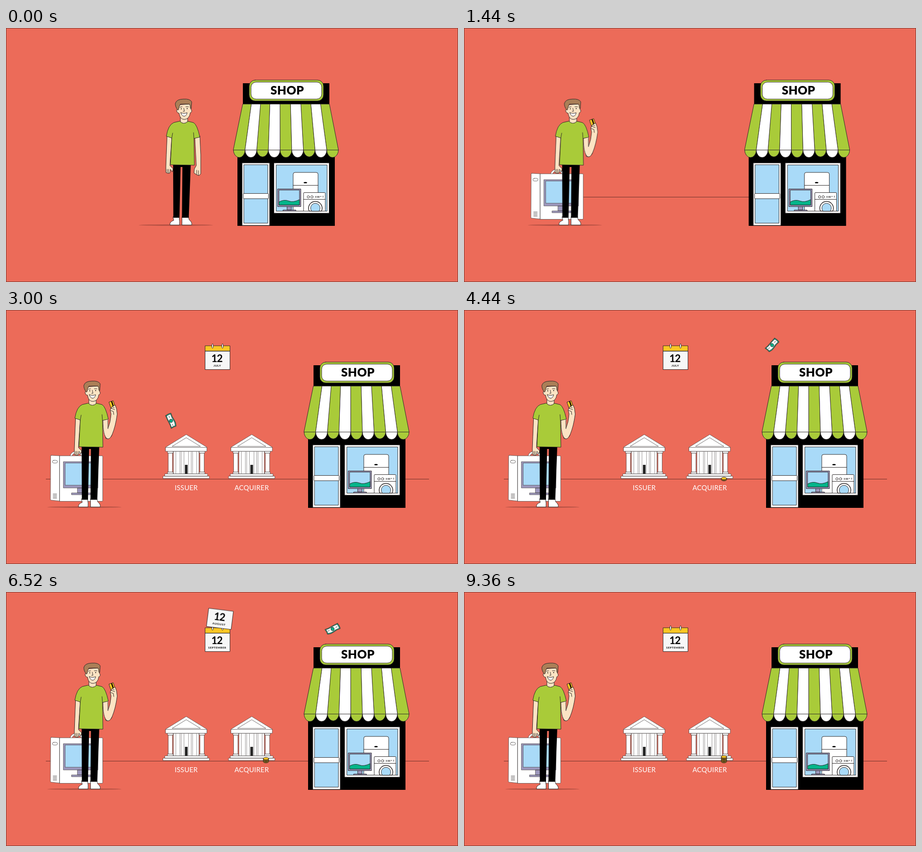
Animation of 998x561 px, one loop 10 s. Source, as an HTML page without scripts:

```html
<!DOCTYPE html>
<html lang="en">
<head>
<meta charset="utf-8">
<title>Shop payment</title>
<style>
html, body { margin: 0; width: 100%; height: 100%; overflow: hidden; background: #ec6b59; }
svg { display: block; width: 998px; height: 561px; }
text { font-family: Lato, "Open Sans", sans-serif; text-anchor: middle; stroke: none; }
.ink { stroke: #2b2626; stroke-width: 1; stroke-linejoin: round; stroke-linecap: round; }
.thin { stroke: #4a4646; stroke-width: .8; }
.white { fill: #fff; } .green { fill: #a9cb39; } .blue { fill: #a9daf8; } .skin { fill: #fce3c3; }
.mauve { fill: #9d98bd; } .teal { fill: #04b58a; } .gold { fill: #fcc624; } .none { fill: none; }
.dark { fill: #000; stroke: none; }
.day { font-size: 22.5px; font-weight: 700; letter-spacing: -1px; }
.month { font-size: 6.4px; font-weight: 700; letter-spacing: .6px; }
.label { font-size: 15px; fill: #fff; letter-spacing: .2px; }

.a { animation: none 10s linear var(--d, 0s) infinite; }
.second { --d: 1.88s; }
.third { --d: 3.8s; }

/* opening: purchase, then both sides part */
.man { animation-name: man; }
.shop { animation-name: shop; }
.road { animation-name: road; transform-origin: 511px 373px; }
.box { animation-name: box; transform-origin: 156px 316px; }
.arm-down { animation-name: armDown; transform-origin: 220px 240px; }
.arm-up { animation-name: armUp; }
.forearm { animation-name: forearm; transform-origin: 223px 278px; }
@keyframes man {
  0%, 9.6% { transform: translateX(202px); animation-timing-function: cubic-bezier(.37, 0, .63, 1); }
  16.8%, 100% { transform: none; }
}
@keyframes shop {
  0%, 9.6% { transform: translateX(-156px); animation-timing-function: cubic-bezier(.37, 0, .63, 1); }
  16.8%, 100% { transform: none; }
}
@keyframes road {
  0%, 9.6% { transform: scaleX(0); animation-timing-function: cubic-bezier(.37, 0, .63, 1); }
  16.8%, 100% { transform: none; }
}
@keyframes box {
  0%, 2% { transform: scale(0); animation-timing-function: cubic-bezier(.2, .7, .3, 1); }
  7%, 100% { transform: none; }
}
@keyframes armDown {
  0%, 2% { transform: none; opacity: 1; animation-timing-function: ease-in; }
  3.99% { transform: rotate(-28deg); opacity: 1; }
  4%, 100% { transform: rotate(-28deg); opacity: 0; }
}
@keyframes armUp { 0%, 3.99% { opacity: 0; } 4%, 100% { opacity: 1; } }
@keyframes forearm {
  0%, 4% { transform: rotate(95deg); animation-timing-function: cubic-bezier(.2, .6, .3, 1); }
  8%, 100% { transform: none; }
}

/* banks and calendar */
.bank { animation-name: bank; transform-origin: 0 372px; }
.late { animation-name: late; }
.cal { animation-name: cal; transform-origin: 467px 104px; }
.page { animation-name: tear; transform-origin: 467px 91px; }
.august { --d: 1.65s; }
@keyframes bank {
  0%, 20.4% { transform: scale(0); animation-timing-function: ease-out; }
  25%, 100% { transform: none; }
}
@keyframes late {
  0%, 21.4% { transform: scale(0); animation-timing-function: ease-out; }
  26%, 100% { transform: none; }
}
@keyframes cal {
  0%, 22.4% { transform: scale(0); animation-timing-function: ease-out; }
  26%, 100% { transform: none; }
}
@keyframes tear {
  0%, 44.8% { transform: none; animation-timing-function: ease-in; }
  52.5%, 100% { transform: translate(24px, -160px) rotate(22deg); }
}

/* one money trip, repeated with delays */
.bx { animation-name: bx; opacity: 0; }
.by { animation-name: by; }
.br { animation-name: br; }
.fee { animation-name: fee; opacity: 0; }
.coin { animation-name: coin; opacity: 0; }
.stack { animation-name: stack; }
@keyframes bx {
  0%, 27.5% { opacity: 0; transform: translateX(237px); }
  27.8% { opacity: 1; transform: translateX(240px); }
  30% { transform: translateX(364px); }
  30.8%, 31.8% { transform: translateX(398px); }
  35.6% { transform: translateX(538px); }
  37.6% { transform: translateX(542px); }
  38.8% { transform: translateX(569px); }
  44.4% { transform: translateX(680px); }
  48.8% { opacity: 1; transform: translateX(770px); }
  49%, 100% { opacity: 0; transform: translateX(770px); }
}
@keyframes by {
  0%, 27.5% { transform: translateY(210px); animation-timing-function: ease-out; }
  28.6% { transform: translateY(198px); animation-timing-function: ease-in; }
  30% { transform: translateY(244px); }
  30.8%, 31.8% { transform: translateY(305px); animation-timing-function: ease-out; }
  33.6% { transform: translateY(210px); animation-timing-function: ease-in; }
  35.6% { transform: translateY(310px); }
  37.6% { transform: translateY(305px); animation-timing-function: cubic-bezier(.2, .5, .5, 1); }
  45.4% { transform: translateY(75px); animation-timing-function: ease-in; }
  48.8%, 100% { transform: translateY(128px); }
}
@keyframes br {
  0%, 27.5% { transform: rotate(-70deg) scale(.3); }
  28.6% { transform: rotate(-50deg) scale(1); }
  30% { transform: rotate(-22deg) scale(1); }
  31.8% { transform: rotate(-8deg) scale(1); }
  35.6% { transform: rotate(32deg) scale(1); }
  38.8% { transform: rotate(4deg) scale(1); }
  44.4% { transform: rotate(45deg) scale(1); }
  48.8%, 100% { transform: rotate(90deg) scale(1); }
}
@keyframes fee {
  0%, 33.6% { opacity: 0; transform: translateY(20px); }
  35%, 35.6% { opacity: 1; transform: translateY(13px); }
  38.8% { opacity: 1; transform: none; }
  41.5%, 100% { opacity: 0; transform: translateY(-10px); }
}
@keyframes coin {
  0%, 38.2% { opacity: 0; transform: translate(564px, 248px) rotate(-28deg); }
  38.3% { opacity: 1; }
  38.8% { opacity: 1; transform: translate(570px, 259px) rotate(-16deg); animation-timing-function: ease-in; }
  42%, 100% { opacity: 1; transform: translate(574px, 373px) rotate(0deg); }
}
@keyframes stack { 0%, 38.1% { opacity: 0; } 38.11%, 100% { opacity: 1; } }
</style>
</head>
<body>
<svg viewBox="0 0 998 561">
  <defs>
    <g id="pillar" class="white">
      <path d="M-4.500 316H4.500V358H-4.500Z"/>
      <path d="M-6 312H6V316H-6ZM-6 358H6V362H-6Z"/>
    </g>
    <g id="bank" class="ink thin">
      <path class="white" d="M-28 312H28V362H-28Z"/>
      <path class="none" stroke-width=".6" d="M-23 313V361M-14 313V361M-11 313V361M-5 313V361M5 313V361M11 313V361M14 313V361M23 313V361"/>
      <path class="dark" fill-opacity=".85" d="M-3 342H3V362H-3Z"/>
      <use href="#pillar" x="-35"/><use href="#pillar" x="35"/>
      <path class="white" d="M-45.500 303L0 275 45.500 303V312H-45.500Z"/>
      <path class="none" d="M-45.500 303.500H45.500M-31 301L0 282 31 301Z"/>
      <path class="white" d="M-47 362H47V367H-47ZM-51 367H51V372H-51Z"/>
    </g>
    <g id="bill" class="ink">
      <path class="teal" d="M-7-15Q-1-17 6-16Q5-7 7 0T6 15Q0 14-6 16Q-5 8-6 1T-7-15Z"/>
      <path class="white" stroke-width=".6" d="M-5.200-13.200Q-1-14.800 4.300-14Q3.500-6 5.200 0T4.300 13.300Q0 12.500-4.400 14Q-3.400 7-4.500 1T-5.200-13.200Z"/>
      <circle class="teal" r="3.700"/>
      <path class="none" d="M-.5-11V-8M0 8V11"/>
    </g>
    <g id="coin" class="ink">
      <path fill="#8a6414" d="M-6-1V1.500A6 3 0 0 0 6 1.500V-1Z"/>
      <ellipse class="gold" cy="-1" rx="6" ry="2.800"/>
    </g>
    <g id="page">
      <path class="ink" fill="#f7f7f7" d="M440 91H494.500V131.500H440Z"/>
      <text class="day" x="465.500" y="114.800">12</text>
    </g>
  </defs>

  <rect width="998" height="561" fill="#ec6b59"/>
  <path class="a road" d="M88 373.500H934" stroke="#6b2f28"/>

  <g transform="translate(398)"><g class="a bank"><use href="#bank"/><text class="label" y="397.700">ISSUER</text></g></g>
  <g transform="translate(542.500)"><g class="a bank late"><use href="#bank"/><text class="label" y="397.700">ACQUIRER</text></g></g>

  <g class="a cal">
    <path class="ink gold" d="M440 79H494.500V91H440Z"/>
    <g class="ink white"><rect x="454.500" y="75" width="3" height="9" rx="1.500"/><rect x="476.500" y="75" width="3" height="9" rx="1.500"/></g>
    <g><use href="#page"/><text class="month" x="466.500" y="124.500" style="font-size:6px">SEPTEMBER</text></g>
    <g class="a page august"><use href="#page"/><text class="month" x="466.500" y="124.500">AUGUST</text></g>
    <g class="a page"><use href="#page"/><text class="month" x="466.500" y="124.500">JULY</text></g>
  </g>

  <g class="a man">
    <ellipse cx="173" cy="435.300" rx="82" ry="1.500" fill="#b04f42"/>
    <g class="a box ink thin">
      <path class="none" stroke-width="5" d="M144 321Q147 314 156 314T168 321"/>
      <path class="none" style="stroke:#fff" stroke-width="3.400" d="M144 321Q147 314 156 314T168 321"/>
      <path class="white" d="M100 321L118.500 322V422L99.500 420Q98 420 98 418L98.500 323Q98.500 321 100 321ZM118.500 322H212Q213.500 322 213.500 324V420.500Q213.500 422.500 212 422.500H118.500Z"/>
      <rect class="none" x="102.500" y="332" width="11" height="6" rx="3"/>
      <path class="none" d="M104 406H112M104 408.500H112M104 411H112M104 413.500H112M104 416H112"/>
      <path class="mauve" d="M127 335H203V393H127ZM158 393H174V404H158ZM145 404H187V408H145Z"/>
      <path class="blue" d="M131 338H199V387H131Z"/>
    </g>

    <path class="ink white" d="M167 417H180Q182 428 181 435H160Q159 428 168 425ZM187 417H201Q201 424 206 427Q209 431 208 435H187Z"/>
    <path class="dark" d="M167 300H206L201.500 419H186.500L187.500 307H183.500L181 419H167.500Z"/>

    <g class="ink skin">
      <path d="M154 238L164 241L161 287L160 304L167 311 165 318 161 312 160 320 156 321 151 319V306L152 280Z"/>
      <path class="none" d="M154 319V312M157 320V312"/>
      <g class="a arm-down">
        <path d="M215 238H226L228 280V305L228 322 224 326 219 324 213 320 214 311 218 304Z"/>
        <path class="none" d="M219 323V314M223 325V315"/>
      </g>
      <g class="a arm-up">
        <g class="a forearm">
          <g transform="rotate(-19 234 208)">
            <rect class="gold" x="229" y="201.500" width="10" height="14.500" rx="1"/>
            <path class="dark" d="M234 202H236.500V215.500H234Z"/>
          </g>
          <path d="M217 270L225 262Q231 247 232 230L230 221 234 213.500 241 210 244 218 245.500 230Q242 257 234 276Q229 287 221 284Z"/>
          <path class="none" d="M234 213.500L239 216M232 217L240 220M231 222L237 224 238 231"/>
        </g>
        <path d="M214 238H225L226 255 225 262 232 277Q229 287 223 284Q215 278 214 260Z" stroke="none"/>
        <path class="none" d="M225 243V262M214 243Q214 278 223 284Q229 287 234 276"/>
      </g>
      <path d="M183 194V208Q190 215 199 208V194Z"/>
    </g>
    <path class="ink green" d="M182 206Q190 215 200 206L212 209Q220 213 226 241L213 244 214 303 161 302 164 243 152 239Q156 214 168 209Z"/>
    <path class="ink none" d="M164 243L166 232M213 244L212 231"/>

    <g class="ink">
      <path class="skin" d="M179 170L178 180Q174 179 175 184Q177 189 180 188Q182 202 192 202Q203 201 205 187Q208 187 208 182L206 179 207 168Z"/>
      <path fill="#ab7f57" d="M177 181Q171 173 172 166Q175 157 190 157Q204 156 208 163L207 178 205 177Q205 170 203 168L183 168Q180 173 179 180Z"/>
      <path class="none" d="M182 175L187 174M195 174L201 174M190.500 177L192 184H189"/>
      <circle class="dark" cx="185" cy="178.500" r="1.100"/><circle class="dark" cx="198" cy="178" r="1.100"/>
      <path class="white" d="M184 187Q191 190 198 187Q196 195 191 195Q186 194 184 187Z"/>
    </g>
  </g>

  <g class="a stack">
    <use href="#coin" class="a coin"/>
    <g class="second" transform="translate(0 -4)"><use href="#coin" class="a coin"/></g>
    <g class="third" transform="translate(0 -8)"><use href="#coin" class="a coin"/></g>
  </g>

  <g font-size="23" fill="#fff">
    <text class="a fee" x="539" y="251">-%</text>
    <text class="a fee second" x="539" y="251">-%</text>
    <text class="a fee third" x="539" y="251">-%</text>
  </g>

  <g class="a bx"><g class="a by"><use href="#bill" class="a br"/></g></g>
  <g class="a bx second"><g class="a by"><use href="#bill" class="a br"/></g></g>
  <g class="a bx third"><g class="a by"><use href="#bill" class="a br"/></g></g>

  <g class="a shop">
    <path class="dark" d="M679 122H870V170H679ZM667 268H882V437H667Z"/>
    <g class="ink">
      <rect class="green" x="693" y="115" width="164" height="46" rx="13"/>
      <rect class="white" x="697" y="119.500" width="156" height="37.500" rx="11"/>
      <path class="green" d="M679 168H698L683.800 269a12.900 17 0 0 1-25.800 0ZM718 168H739L735.300 269a12.900 17 0 0 1-25.700 0ZM761 168H784.500L786.900 269a12.900 17 0 0 1-25.800 0ZM807 168H829.500L838.400 269a12.900 17 0 0 1-25.700 0ZM850.500 168H870L890 269a12.900 17 0 0 1-25.800 0Z"/>
      <path class="white" d="M698 168H718L709.600 269a12.900 17 0 0 1-25.800 0ZM739 168H761L761.100 269a12.900 17 0 0 1-25.800 0ZM784.500 168H807L812.700 269a12.900 17 0 0 1-25.800 0ZM829.500 168H850.500L864.200 269a12.900 17 0 0 1-25.800 0Z"/>
      <path class="none" d="M658 269.500H890"/>

      <path class="white" d="M677.500 298H738V436H677.500ZM748 298H869.500V409H748Z"/>
      <path class="blue" d="M681.500 302H734V431H681.500ZM753 302.500H865V404.500H753Z"/>
      <rect class="white" x="680" y="365.500" width="55.500" height="11.500" rx="1"/>

      <path class="white" d="M790 404V323Q790 319 794 319H841Q845 319 845 323V404ZM790 347.500H845"/>
      <ellipse class="dark" cx="817" cy="341.500" rx="3.800" ry="1.500"/>
      <rect class="white" x="813" y="363.500" width="48" height="41" rx="1.500"/>
      <path class="none" d="M813 378.500H861M839 372H841M843 372H848M850 372H852M839 374H841M843 374H848M856 371V374"/>
      <circle class="white" cx="823.500" cy="373" r="2.600"/><circle class="white" cx="831.500" cy="373" r="2.600"/>
      <path class="white" stroke-width="1.500" d="M825.500 404.500A15 15 0 1 1 852.500 404.500Z"/>
      <path class="blue" d="M831 404.500A10.500 10.500 0 1 1 847 404.500Z"/>
      <path class="mauve" d="M756 355.500H807V394.500H756ZM777 394.500H786V402H777ZM768 402H796V404.500H768Z"/>
      <path class="blue" d="M759 358H804V391H759Z"/>
      <path class="teal" d="M759 384Q770 378 780 382T804 379V391H759Z"/>
    </g>
    <text x="777" y="147" font-size="26" font-weight="900" letter-spacing=".4">SHOP</text>
  </g>

  <path fill="none" stroke="#000" stroke-opacity=".5" d="M.5.500H997.500V560.500H.500Z"/>
</svg>
</body>
</html>
```
